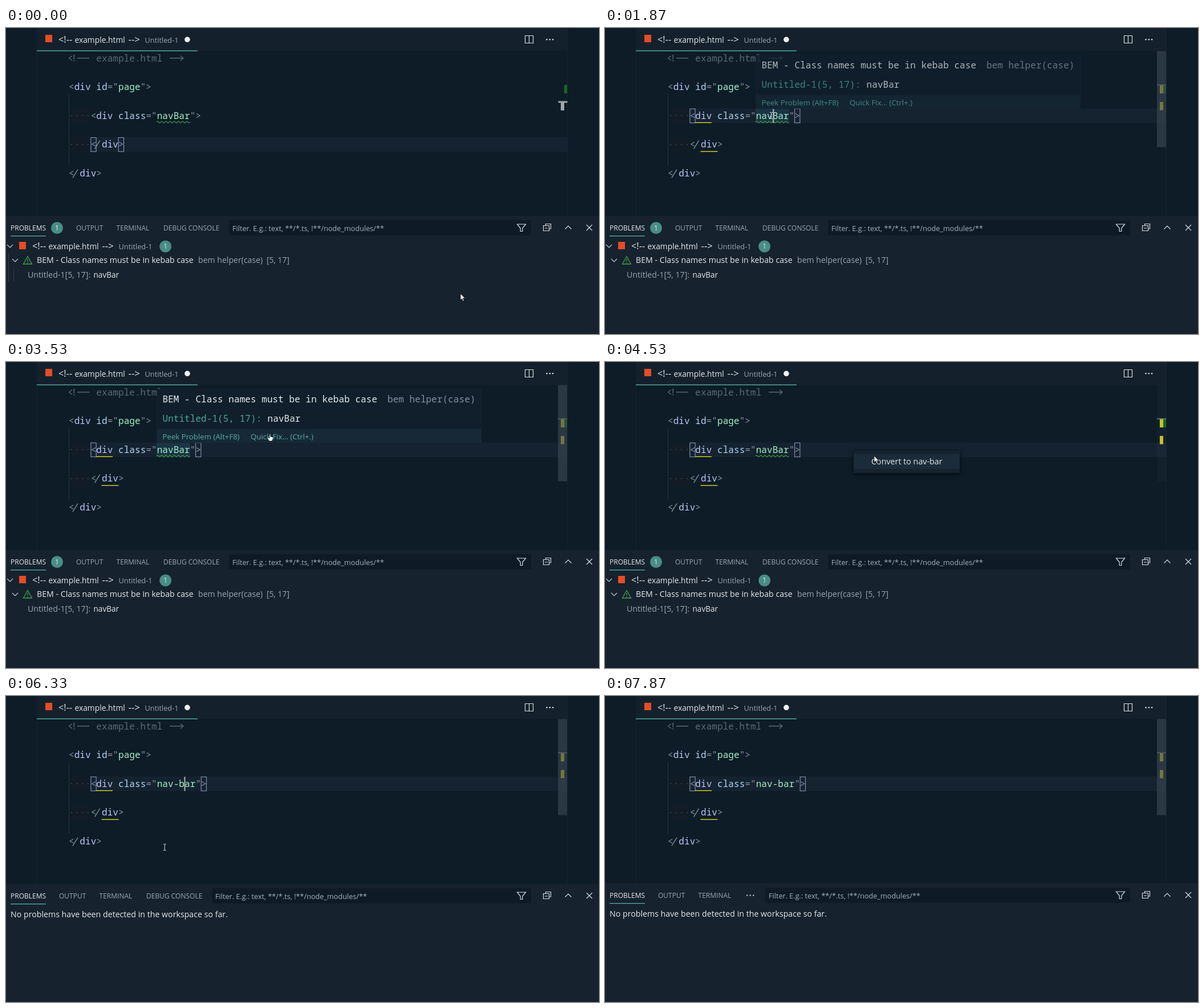
Animation, 1040 px wide and 538 px high, one loop 7.94 s. Source, as an HTML page:

```html
<!DOCTYPE html>
<html lang="en">
<head>
<meta charset="utf-8">
<title>Kebab case quick fix</title>
<style>
  html, body { margin: 0; width: 100%; height: 100%; overflow: hidden; background: #0d1c27; }
  svg { display: block; width: 1040px; height: 538px; }
  text { font-family: "Open Sans", "Noto Sans", sans-serif; white-space: pre; }
  .code { font-family: "Noto Sans Mono", "DejaVu Sans Mono", monospace; font-size: 16.1px; }
</style>
</head>
<body>
<svg id="stage" viewBox="0 0 1040 538" xmlns="http://www.w3.org/2000/svg"></svg>
<script>
const LOOP = 7940;
const CHAR = 9.67;
const LEFT = 110;
const C = {
  editor: '#0d1c27', bar: '#14212c', panel: '#16222e', tag: '#c0c3f7', attr: '#b0d4f5', string: '#a6efc6',
  punct: '#8795a1', comment: '#5a6973', bright: '#e4e9ed', dim: '#9ba6af', teal: '#52b0a4',
  icon: '#d8dde1', orange: '#e44d26', yellow: '#dcd81c', green: '#3fa548'
};

const rect = (x, y, w, h, fill, extra = '') =>
  `<rect x="${x}" y="${y}" width="${w}" height="${h}" fill="${fill}" ${extra}/>`;
const stroke = (d, color, width = 1) =>
  `<path d="${d}" fill="none" stroke="${color}" stroke-width="${width}"/>`;
const escape = s => s.replace(/&/g, '&amp;').replace(/</g, '&lt;').replace(/>/g, '&gt;');
const label = (x, y, s, color, size = 14.2) =>
  `<text x="${x}" y="${y}" fill="${color}" font-size="${size}">${escape(s)}</text>`;
const mono = (x, y, s, color) => `<text class="code" x="${x}" y="${y}" fill="${color}">${escape(s)}</text>`;
const group = (id, body) => `<g id="${id}">${body}</g>`;
const dots = (cx, cy, gap, r, n, color) =>
  Array.from({ length: n }, (_, i) => `<circle cx="${cx + i * gap}" cy="${cy}" r="${r}" fill="${color}"/>`).join('');
const col = n => LEFT + n * CHAR;

// Lays out coloured runs one after another from a character column.
function runs(start, y, parts) {
  let at = start;
  return parts.map(([s, color]) => {
    const out = mono(col(at), y, s, color);
    at += s.length;
    return out;
  }).join('');
}

// The two characters of "</" lean into each other like a ligature.
function closeTag(start, y) {
  const x = col(start);
  return mono(x, y, '<', C.punct) + stroke(`M${x + 7} ${y + 2}L${x + 16} ${y - 12.5}`, C.punct, 1.3) +
    runs(start + 2, y, [['div', C.tag], ['>', C.punct]]);
}

const openTag = (start, y, attr, value) => runs(start, y, [
  ['<', C.punct], ['div ', C.tag], [attr, C.attr], ['="', C.punct], [value, C.string], ['">', C.punct]
]);

const bracketBox = (n, y) =>
  rect(col(n) + 0.2, y, 9.3, 24.6, 'none', 'stroke="#8f93bd" stroke-width="1.1"');

const indent = y => rect(LEFT + 1, y - 13, 37, 26, '#111c26') + dots(col(0.5), y, CHAR, 1.1, 4, '#384550');

function fileName(x, y) {
  return label(x, y, '<!--', C.bright, 16.3) + label(x + 28.5, y, 'example.html', C.bright, 13.8) +
    label(x + 122.5, y, '-->', C.bright, 16.8) + label(x + 151.5, y, 'Untitled-1', C.dim, 12.8);
}

function badge(x, y) {
  return `<circle cx="${x}" cy="${y}" r="10.5" fill="#488d85"/>` + label(x - 3.5, y + 4.3, '1', C.bright, 12);
}

function tabs(x, names) {
  return names.map(([dx, s]) => label(x + dx, 355.8, s, C.dim, 12)).join('');
}

function filterBox(x) {
  return rect(x, 338, 921 - x, 26.5, '#0e1b27') +
    label(x + 6, 356.5, 'Filter. E.g.: text, **/*.ts, !**/node_modules/**', '#a6b0b8', 12.65);
}

const threeTabs = [[0, 'OUTPUT'], [70.5, 'TERMINAL']];
const fourTabs = [...threeTabs, [153, 'DEBUG CONSOLE']];

const frameArt =
  rect(54, 0, 930, 40.5, C.bar) +
  stroke('M54.5 41V330M984.5 0V330', '#142631') +
  rect(54, 39.5, 282, 1.4, C.teal) +
  rect(69, 12, 12, 13, C.orange) + fileName(92, 25.5) +
  '<circle cx="318" cy="20.3" r="4.8" fill="#f0f2f3"/>' +
  stroke('M910.5 13.5h14v13h-14zM917.5 13.5v13', C.icon, 1.2) + dots(948.5, 20.3, 5.3, 1.3, 3, C.icon);

const codeArt =
  stroke('M116 49L110.5 53L116 57M125 53H146M287 53H311M306 48.7L311 53L306 57.3', C.comment, 1.3) +
  mono(114.5, 58.5, '!', C.comment) + mono(col(5), 58.5, 'example.html', C.comment) +
  openTag(0, 109, 'id', 'page') +
  indent(154) + indent(205) + stroke('M110.5 116V243', '#24333e') +
  closeTag(4, 210.3) + closeTag(0, 261.3);

const squiggle = 'M264 165.5' + 'q1.83 -2.6 3.66 0t3.66 0'.repeat(8);

const rulerMarks =
  group('greenMark', rect(979, 100, 5, 15, '#166623')) +
  group('oldMarks', rect(968.5, 128.5, 16, 3, '#9fa6aa') + rect(973, 130, 6, 15, '#9fa6aa')) +
  group('newMarks', rect(968, 99, 16, 1.6, '#7b868d') + rect(973, 100.5, 6, 14.5, C.yellow) + rect(973, 130, 6, 14.5, C.yellow)) +
  group('slider', rect(968, 40.5, 16, 169, '#3b4650', 'fill-opacity=".65"'));

const hoverCard =
  rect(264.5, 47.5, 569, 94.5, '#101f2b', 'stroke="#142631"') + rect(265, 118, 568, 24, '#172936') +
  mono(274.5, 70.6, 'BEM - Class names must be in kebab case', C.bright) +
  mono(669, 70.6, 'bem helper(case)', '#84919b') +
  mono(274.5, 105.2, 'Untitled-1(5, 17):', '#4aa59a') + mono(458.6, 105.2, 'navBar', C.bright) +
  label(274.5, 136, 'Peek Problem (Alt+F8)', C.teal, 13.25) +
  label(429, 136, 'Quick Fix… (Ctrl+.)', C.teal, 13.25);

const menuArt =
  rect(436, 156, 186, 39, '#16232f', 'style="filter:drop-shadow(0 2px 4px #050b10)"') +
  rect(436, 162, 186, 26, '#1b2b39') + label(467, 180, 'Convert to nav-bar', C.bright, 14.3);

const tree =
  stroke('M2 381l5 5 5-5M11 406l5 5 5-5', '#c3cbd1', 1.2) +
  rect(23, 376, 12, 13, C.orange) + fileName(46, 388.5) + badge(279.7, 384) +
  stroke('M38 401.5L45.5 415H30.5ZM38 406v4.5M38 412v1.4', C.green, 1.3) +
  label(54, 413.3, 'BEM - Class names must be in kebab case', C.bright) +
  label(337, 413.3, 'bem helper(case)', C.dim, 14.1) + label(457, 413.3, '[5, 17]', C.dim, 13.9) +
  label(38, 439, 'Untitled-1[5, 17]:', C.dim) + label(153.5, 439, 'navBar', C.bright, 13.6) +
  group('guides', stroke('M4.5 396V446M13.5 421V446', '#33414c'));

const panelArt =
  rect(0, 330, 1040, 210, C.panel) +
  label(8, 355.8, 'PROBLEMS', C.bright, 12) + rect(8, 365, 62, 1.3, C.teal) +
  group('listed', badge(89.5, 351.5) + tabs(123, fourTabs) + filterBox(391) + tree) +
  group('empty', label(8, 388.5, 'No problems have been detected in the workspace so far.', C.bright)) +
  group('wideTabs', tabs(93, fourTabs) + filterBox(361)) +
  group('narrowTabs', tabs(93, threeTabs) + dots(249.3, 351.5, 5.5, 1.3, 3, '#b5bec5') + filterBox(281)) +
  stroke('M896.5 345h15l-5.7 7v5.5h-3.6V352Z', C.icon, 1.2) +
  stroke('M946.5 347v-2.5h9v8.5h-2.5M942.5 347.5h10v9h-10zM945 352h5', C.icon, 1.2) +
  stroke('M980.5 353.5l5.5-5.5 5.5 5.5M1018 346l10 10M1028 346l-10 10', C.icon, 1.2);

const pointers =
  group('arrow', '<path d="M0 0V11.3L2.6 8.9L4.5 13.2L6.4 12.4L4.5 8.2H8Z" fill="#fff" stroke="#111" stroke-width=".8"/>') +
  group('beam', stroke('M-2.5 -5.5H-.6L0 -5L.6 -5.5H2.5M0 -5V5M-2.5 5.5H-.6L0 5L.6 5.5H2.5', '#d9dde0')) +
  group('hand', '<path d="M-1 -6Q0 -7 1 -6V-2L5 -1Q6 0 5 3L3.5 6H-1.5L-4.5 1Q-4 -1 -2.5 0L-1 1Z" fill="#fff" stroke="#111" stroke-width=".8"/>');

const stage = document.getElementById('stage');
stage.innerHTML =
  rect(0, 0, 1040, 538, C.editor) + frameArt +
  group('activeLine', rect(LEFT + 1, 0, 873, 25.5, '#14232f')) +
  group('wordGlow', rect(264, 142, 59, 24.5, '#1a3645')) + codeArt +
  group('oldBoxes', bracketBox(4, 192.7) + bracketBox(9, 192.7)) +
  group('newBoxes', bracketBox(4, 142.2) + rect(158, 165.7, 29, 1.4, C.yellow) + rect(167.5, 216.4, 30, 1.4, C.yellow)) +
  group('camel', openTag(4, 159.8, 'class', 'navBar') + stroke(squiggle, C.green, 1.2)) +
  group('camelBox', bracketBox(23, 142.2)) +
  group('kebab', openTag(4, 159.8, 'class', 'nav-bar') + bracketBox(24, 142.2)) +
  group('caret', rect(-1, 142, 2, 25, '#a9b4bb')) +
  rulerMarks + group('panel', panelArt) + group('hover', hoverCard) + group('menu', menuArt) + pointers;

const part = {};
for (const g of stage.querySelectorAll('g[id]')) part[g.id] = g;

const show = (id, on) => { part[id].style.display = on ? '' : 'none'; };
const fade = (id, alpha) => { show(id, alpha > 0); part[id].style.opacity = alpha; };
const move = (id, x, y) => part[id].setAttribute('transform', `translate(${x.toFixed(2)} ${y.toFixed(2)})`);
const ramp = (t, a, b) => Math.min(1, Math.max(0, (t - a) / (b - a)));
const between = (t, a, b) => t >= a && t < b;

// Pointer stops: time, x, y.
const path = [
  [30, 797, 467], [700, 295.5, 157], [1180, 295.5, 157], [1330, 293, 178], [1530, 291.5, 154],
  [2640, 291.5, 154], [3400, 458, 132], [3530, 463, 133], [3680, 466, 133], [3930, 466, 140],
  [4530, 472, 165], [4650, 474, 168], [4800, 478, 175], [5360, 480, 176], [5600, 472, 200],
  [6130, 335, 224], [6330, 278.5, 265.5], [6930, 124, 493], [7070, 87, 522], [7130, 72, 545]
];
const smooth = new Set([30, 1180, 2640, 3930, 5360]);

function pointerAt(t) {
  if (t <= path[0][0]) return path[0].slice(1);
  const i = path.findIndex(p => p[0] > t);
  if (i < 0) return path[path.length - 1].slice(1);
  const [a, b] = [path[i - 1], path[i]];
  let k = ramp(t, a[0], b[0]);
  if (smooth.has(a[0])) k = k * k * (3 - 2 * k);
  return [a[1] + (b[1] - a[1]) * k, a[2] + (b[2] - a[2]) * k];
}

function caretVisible(t) {
  if (between(t, 3930, 5000)) return false;
  const start = t < 3930 ? 700 : 5000;
  return t >= start && Math.floor((t - start) / 500) % 2 === 0;
}

function sliderAlpha(t) {
  if (t < 3900) return ramp(t, 380, 480);
  if (t < 5000) return 1 - ramp(t, 3900, 4700);
  if (t < 6600) return ramp(t, 5000, 5100);
  if (t < 7780) return 1 - ramp(t, 6600, 7270);
  return ramp(t, 7780, 7860);
}

function render(t) {
  const clicked = t >= 700;
  const fixed = t >= 5000;
  const cleared = t >= 5100;
  const narrow = t >= 7800;

  move('activeLine', 0, clicked ? 141.5 : 192);
  show('oldBoxes', !clicked);
  show('oldMarks', !clicked);
  show('newBoxes', clicked);
  show('newMarks', clicked);
  show('camel', !fixed);
  show('camelBox', clicked && !fixed);
  show('kebab', fixed);
  show('greenMark', !cleared);
  show('wordGlow', between(t, 1730, 3930));
  show('caret', caretVisible(t));
  move('caret', fixed ? 313.5 : 295.3, 0);

  fade('slider', sliderAlpha(t));
  fade('hover', t < 3930 ? ramp(t, 1690, 1930) : 0);
  show('menu', between(t, 3930, 5000));
  fade('guides', 1 - ramp(t, 300, 420));

  show('listed', !cleared);
  show('empty', cleared);
  show('wideTabs', cleared && !narrow);
  show('narrowTabs', narrow);
  move('panel', 0, narrow ? -1 : 0);

  const [x, y] = pointerAt(t);
  const onMenu = between(t, 3930, 5000);
  const onLink = between(t, 2850, 3930) && x > 425 && y > 118 && y < 142;
  const kind = onLink ? 'hand' : y > 330 || onMenu ? 'arrow' : 'beam';
  for (const id of ['arrow', 'beam', 'hand']) show(id, id === kind && t < 7130);
  move(kind, x, y);
}

const begin = performance.now();
function tick() {
  render((performance.now() - begin) % LOOP);
  requestAnimationFrame(tick);
}
render(0);
requestAnimationFrame(tick);
</script>
</body>
</html>
```
